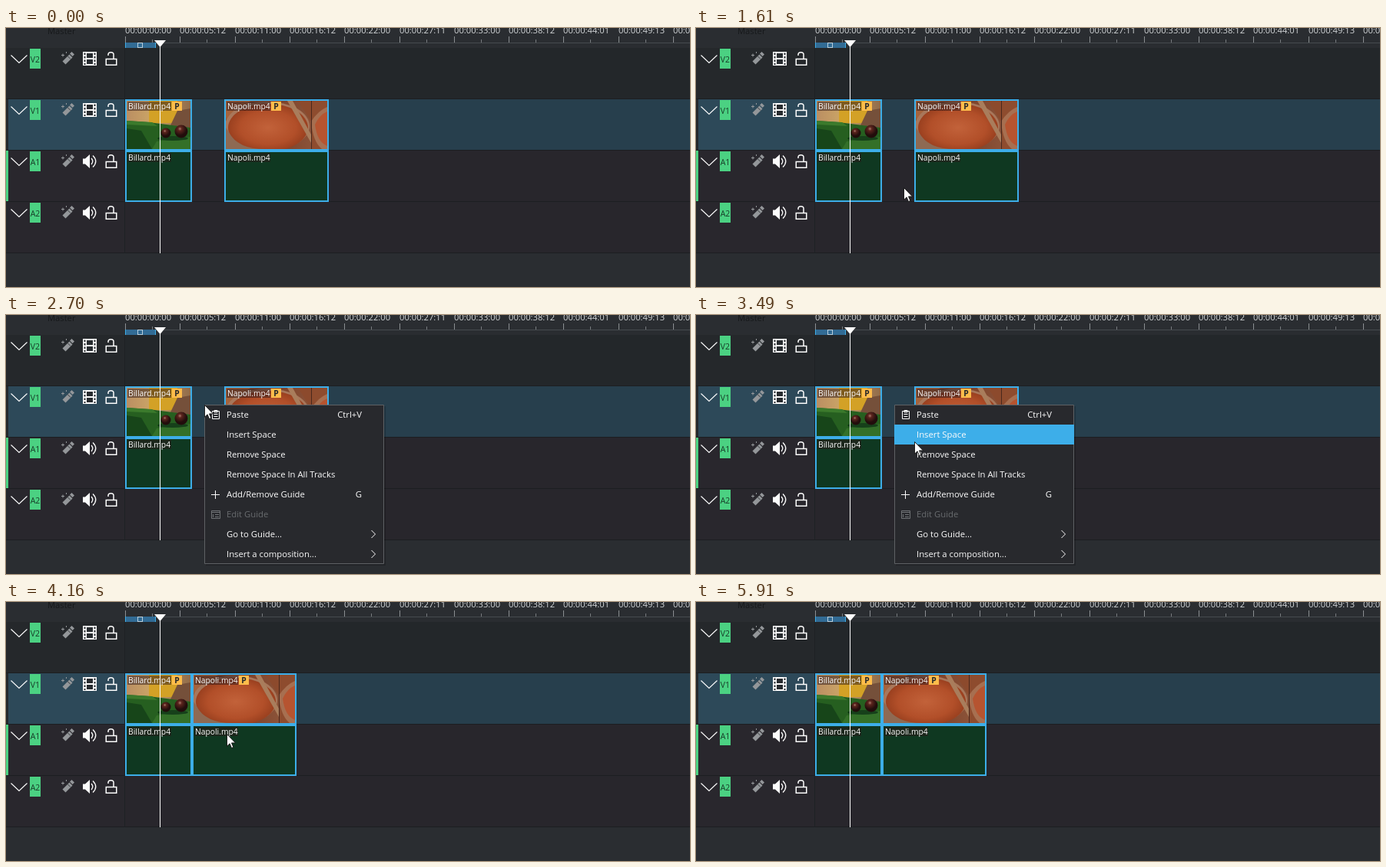
Write an HTML page that moves like this. It is 890 px wide and 338 px high and loops after 6.65 s.

```html
<!DOCTYPE html>
<html lang="en">
<head>
<meta charset="utf-8">
<title>Timeline: remove space</title>
<style>
  html, body { margin: 0; width: 100%; height: 100%; overflow: hidden; background: #2a2d31; }
  svg { display: block; width: 890px; height: 338px; }
  text { font: 11.3px "Open Sans", "Noto Sans", sans-serif; fill: #fcfcfc; white-space: pre; }
  .ruler text { fill: #d5d8da; font-size: 11.2px; }
  .clip text { font-size: 10.3px; }
  .clip .badge { font-weight: 700; fill: #232629; }
  .tag { font-size: 10.5px; fill: #173d28; text-anchor: middle; }
  .line { fill: none; stroke: #fcfcfc; }
  .dim { fill: none; stroke: #707376; }
  .right { text-anchor: end; }
</style>
</head>
<body>
<svg id="stage" viewBox="0 0 890 338">
  <defs>
    <linearGradient id="wall">
      <stop offset="0" stop-color="#b98d62"/><stop offset=".35" stop-color="#c9a266"/>
      <stop offset="1" stop-color="#8f6a49"/>
    </linearGradient>
    <radialGradient id="sauce">
      <stop offset="0" stop-color="#c2623a"/><stop offset=".7" stop-color="#b24f29"/>
      <stop offset="1" stop-color="#9a401f"/>
    </radialGradient>
    <linearGradient id="steel">
      <stop offset="0" stop-color="#8d5d42"/><stop offset=".5" stop-color="#7b4029"/>
      <stop offset="1" stop-color="#935c40"/>
    </linearGradient>
    <radialGradient id="ball" cx=".4" cy=".3">
      <stop offset="0" stop-color="#a9776a"/><stop offset=".3" stop-color="#5b241d"/>
      <stop offset="1" stop-color="#220d0c"/>
    </radialGradient>
    <g id="wand">
      <path d="M2.5 14.500 11.500 5.500 15.500 9.500 6.500 18.500Z" transform="translate(0 -1)" fill="#94979a"/>
      <path d="M9 6.500 13 10.500" stroke="#35383b"/>
      <path d="M12 3.500 14.500 1 18 4.500 15.500 7Z" fill="#94979a"/>
      <path d="M3 3.500V7.500M1 5.500H5M7.500 1V3" stroke="#94979a"/>
    </g>
    <g id="film">
      <path d="M0 0H18V18H0Z" fill="#fcfcfc"/>
      <path d="M5 2H13V8H5ZM5 10H13V16H5Z" fill="#282c30"/>
      <path d="M2.500 1.500V17M15.500 1.500V17" stroke="#282c30" stroke-width="2" stroke-dasharray="2.500 2"/>
    </g>
    <g id="speaker">
      <path d="M0 5.500H3L9 0V18L3 12.500H0Z" fill="#fcfcfc"/>
      <path class="line" d="M11 5Q14.500 9 11 13M13 1.500Q20.500 9 13 16.500" stroke-width="1.300"/>
    </g>
    <g id="lock" class="line" stroke-width="1.500">
      <path d="M.75 9.500H14.250V17.250H.75ZM3.500 5V3.500Q3.500 .75 7 .75T10.500 3.500V9"/>
    </g>
  </defs>

  <g id="tracks"></g>
  <g id="ruler" class="ruler"></g>
  <g id="firstClip" class="clip">
    <path d="M155 93H242V160H155Z" fill="url(#wall)"/>
    <path d="M186 95H223V124H186Z" fill="#d3a126"/>
    <path d="M223 108 240 105V131L214 127Z" fill="#75503a"/>
    <path d="M157 121 186 123 240 130V158H157Z" fill="#265f20"/>
    <path d="M157 121 190 123 197 128 157 126Z" fill="#3b7a2c"/>
    <path d="M157 131 176 134 190 158H157Z" fill="#174519"/>
    <path d="M196 148 240 142V158H190Z" fill="#347029"/>
    <ellipse cx="217" cy="144" rx="20" ry="3" fill="#16401a"/>
    <circle cx="208" cy="137" r="6.500" fill="url(#ball)"/>
    <circle cx="228" cy="135" r="8.500" fill="url(#ball)"/>
  </g>
  <g id="secondClip" class="clip">
    <path d="M284 93H420V160H284Z" fill="url(#steel)"/>
    <path d="M286 95H318L300 111 286 121Z" fill="#a5633d"/>
    <path d="M286 116Q290 142 312 158H286Z" fill="#75543f"/>
    <ellipse cx="340" cy="128" rx="55" ry="32" fill="#a8775b"/>
    <ellipse cx="341" cy="130" rx="52" ry="31" fill="url(#sauce)"/>
    <path d="M290 136Q302 159 340 158H286V130Z" fill="#8e6a53"/>
    <path d="M366 95H373L397 139V150Z" fill="#a97d5c"/>
    <path d="M380 95H397V122Z" fill="#8c4a2d"/>
    <path d="M397 95H418V158H397Z" fill="#8e4c2e"/>
    <path d="M397 122Q406 108 418 103V158H411Q399 148 397 122Z" fill="#a76f50"/>
    <path d="M402 126Q408 113 418 109V154Q405 149 402 126Z" fill="#b65430"/>
    <path d="M397.500 95V158" stroke="#4a281c"/>
  </g>
  <path d="M200.500 24V294" stroke="#fcfcfc"/>
  <path d="M193 16H208L200.500 25Z" fill="#fcfcfc"/>

  <g id="menu">
    <path d="M260 119H494V327H260Z" fill="#000" opacity=".18"/>
    <path d="M258.500 117.500H491.500V324.500H258.500Z" fill="#28292d" stroke="#5e6164"/>
    <path id="hot" d="M258 117H492V143H258Z" fill="#3daee9"/>
    <g id="items"></g>
    <path class="line" d="M268.500 125.500H277.500V135.500H268.500ZM271 124.500H275V127H271ZM270.500 129.500H275.500M270.500 132.500H275.500"/>
    <path class="line" d="M267 234.500H278M272.500 229V240"/>
    <path class="dim" d="M267.500 255.500H278.500V265.500H267.500ZM267 257.500H279M269.500 260V264M272 260.500H277M272 263.500H277"/>
    <path class="line" d="M475.500 281 480.500 286 475.500 291M475.500 307 480.500 312 475.500 317"/>
  </g>
  <circle id="click" cx="0" cy="0" r="12" fill="#c8c814" fill-opacity=".72"/>
  <path id="cursor" d="M.5 .5V16.200L4.100 12.800 6.500 18.500 8.900 17.500 6.500 11.900H11.500Z" fill="#fff" stroke="#111" stroke-width=".9"/>
</svg>
<script>
const LOOP = 6650;
const $ = id => document.getElementById(id);
const add = (id, markup) => $(id).insertAdjacentHTML('beforeend', markup);
const rect = (x, y, w, h, fill, more = '') =>
  `<rect x="${x}" y="${y}" width="${w}" height="${h}" fill="${fill}" ${more}/>`;
const label = (x, y, text, cls = '', more = '') =>
  `<text x="${x}" y="${y}" class="${cls}" ${more}>${text}</text>`;
const icon = (name, x, y) => `<use href="#${name}" x="${x}" y="${y}"/>`;

// Track name, header colour, body colour
const tracks = [
  ['V2', '#25282b', '#23272a'],
  ['V1', '#2d4959', '#273f4d'],
  ['A1', '#29272d', '#28262c'],
  ['A2', '#29272d', '#28262c']
];
tracks.forEach(([name, head, body], i) => {
  const y = 26 + i * 67;
  add('tracks',
    rect(0, y, 155, 67, head) + rect(155, y, 735, 67, body) +
    rect(0, y, 3, 67, name === 'A1' ? '#4bd182' : '#25282b') +
    rect(0, y + 66, 890, 1, '#1c1e21') + rect(154, y, 1, 67, '#1e2124') +
    `<path class="line" d="M6.500 ${y + 9.5}l10.500 10 10.500-10" stroke-width="1.100"/>` +
    rect(31, y + 1, 14, 26, '#4bd182') + label(38, y + 18.5, name, 'tag') +
    icon('wand', 71, y + 4) + icon(name[0] === 'V' ? 'film' : 'speaker', 100, y + 5) +
    icon('lock', 129.5, y + 5));
});

const times = ['00:00', '05:12', '11:00', '16:12', '22:00', '27:11', '33:00', '38:12', '44:01', '49:13', '55:01'];
add('ruler', label(54, 8, 'Master', '', 'style="fill:#17191b"') + rect(155, 19, 735, 1, '#464b4f'));
times.forEach((time, i) => {
  const x = Math.round(155 + i * 71.3);
  add('ruler', label(x, 7.3, '00:00:' + time) +
    rect(x, 11, 1, 8, '#8b8f92') + rect(x + 35, 15, 1, 4, '#777b7e'));
});
add('ruler', rect(155, 19, 40, 7, '#326b94') + rect(155, 19, 1, 7, '#3daee9') +
  rect(194, 19, 1, 7, '#3daee9') +
  rect(171.5, 19.5, 6, 6, '#326b94', 'stroke="#b9cfdd"'));

function dressClip(id, x, width, name, badgeX) {
  const border = y => rect(x + 1, y + 1, width - 2, 65, 'none', 'stroke="#3daee9" stroke-width="2"');
  const title = y => rect(x + 3, y + 3, 57, 12, '#2a1718', 'opacity=".5"') + label(x + 4, y + 12.7, name);
  add(id, rect(x, 160, width, 67, '#0f3821') + border(93) + border(160) + title(93) + title(160) +
    rect(badgeX, 96, 13, 12, '#fdbc4b') + label(badgeX + 3.3, 106, 'P', 'badge'));
}
dressClip('firstClip', 155, 87, 'Billard.mp4', 216);
dressClip('secondClip', 284, 136, 'Napoli.mp4', 345);

const items = [
  ['Paste', 'Ctrl+V'], ['Insert Space'], ['Remove Space'], ['Remove Space In All Tracks'],
  ['Add/Remove Guide', 'G'], ['Edit Guide'], ['Go to Guide...'], ['Insert a composition...']
];
items.forEach(([name, key], i) => {
  const y = 134 + i * 26;
  add('items', label(287, y, name, '', name === 'Edit Guide' ? 'style="fill:#686b6e"' : '') +
    (key ? label(463, y, key, 'right') : ''));
});

// Plays [time, ...values] rows as hard steps.
function play(id, property, steps, format = v => v) {
  const frames = steps.map(([time, ...values]) =>
    ({ offset: time / LOOP, [property]: format(...values), easing: 'step-end' }));
  frames.push({ ...frames[frames.length - 1], offset: 1 });
  $(id).animate(frames, { duration: LOOP, iterations: Infinity });
}
const move = (x, y) => `translate(${x}px, ${y}px)`;
const AWAY = [-60, -60];

play('cursor', 'transform', [
  [0, ...AWAY],
  [1120, 411, 329], [1190, 386, 311], [1260, 359, 290], [1330, 334, 268], [1400, 313, 249],
  [1470, 296, 234], [1540, 281, 221], [1610, 270, 208], [1680, 262, 192], [1750, 257, 177],
  [1820, 254, 162], [1890, 252, 146], [1960, 254, 132], [2030, 257, 122], [2100, 258, 117],
  [3290, 261, 122], [3350, 267, 135], [3420, 276, 151], [3490, 284, 165], [3560, 287, 171], [3630, 287, 172],
  [5770, 420, 226], [5840, 768, 322], [5910, ...AWAY]
], move);
play('click', 'transform', [
  [0, ...AWAY], [2430, 258, 117], [2560, ...AWAY], [4090, 287, 172], [4160, ...AWAY]
], move);
play('menu', 'opacity', [[0, 0], [2560, 0.35], [2630, 0.75], [2700, 1], [4160, 0]]);
play('hot', 'transform', [[0, -400], [3290, 0], [3420, 26], [3560, 52], [4160, -400]], y => move(0, y));
play('secondClip', 'transform', [[0, 0], [4160, -42]], x => move(x, 0));
</script>
</body>
</html>
```
